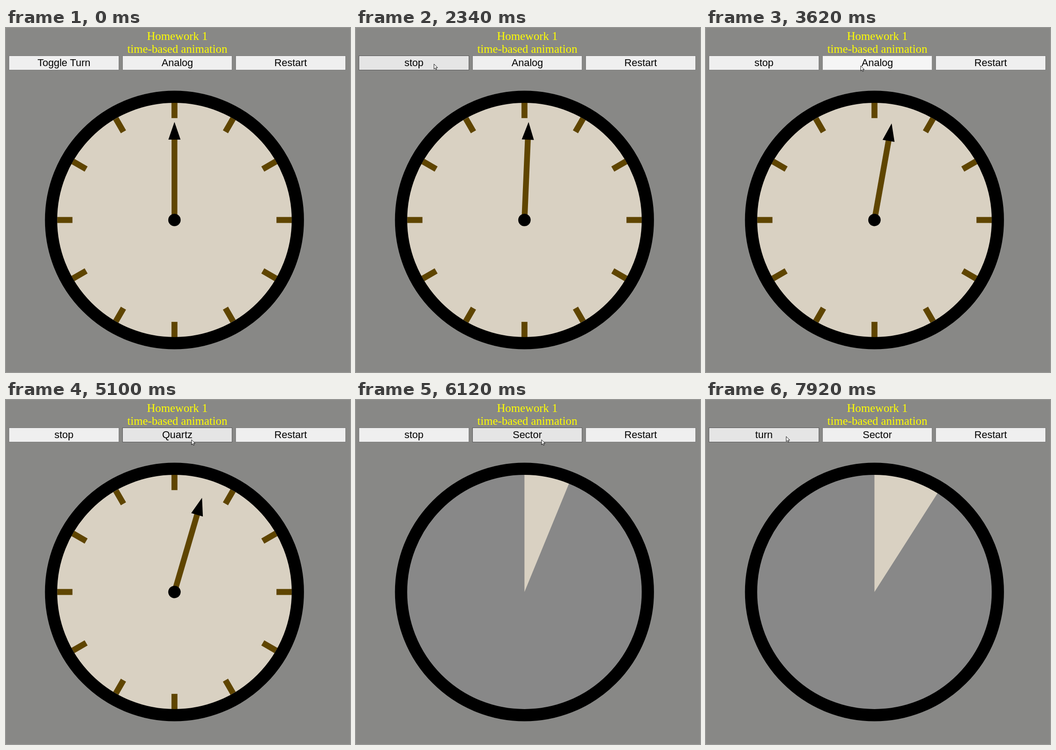
Animation of 748x749 px, one loop 8000 ms. Source, as an HTML page:

```html
<!DOCTYPE html>
<html lang="en">
<head>
<meta charset="utf-8">
<title>time-based animation</title>
<style>
  html, body { margin: 0; width: 100%; height: 100%; overflow: hidden; background: #888886; }
  svg { display: block; width: 748px; height: 749px; }
  .title { font: 25.2px "Liberation Serif", "Times New Roman", serif; fill: #ff0; }
  .label { font: 22px "Liberation Sans", Arial, sans-serif; fill: #000; }
  text { text-anchor: middle; }
  .btn { fill: #efefef; stroke: #7a7a7a; }
  .btn.hover { fill: #e5e5e5; stroke: #555; }
  .btn.active { fill: #f5f5f5; stroke: #8d8d8d; }
</style>
</head>
<body>
<svg viewBox="0 0 748 749">
  <text class="title" x="372.5" y="26">Homework 1</text>
  <text class="title" x="372.5" y="54">time-based animation</text>
  <g id="buttons"></g>
  <g transform="translate(366.3 418)">
    <circle id="face" r="257"/>
    <path id="sector" fill="#d9d1c2"/>
    <g id="ticks" fill="#5f4500"></g>
    <circle r="268.3" fill="none" stroke="#000" stroke-width="26.6"/>
    <g id="hand">
      <rect x="-6.3" y="-176" width="12.6" height="176" fill="#5f4500"/>
      <path d="M0-213.5L13.2-175H-13.2Z"/>
      <circle r="13.5"/>
    </g>
  </g>
  <path id="cursor" d="M.4.5V11.4L2.9 9.1 4.5 12.7 6.3 12 4.7 8.4H8.2Z" fill="#fff" stroke="#000" stroke-width=".9"/>
</svg>
<script>
const LOOP = 8000;
const NS = "http://www.w3.org/2000/svg";
const $ = id => document.getElementById(id);

function add(parent, tag, attrs) {
  const el = document.createElementNS(NS, tag);
  for (const k in attrs) el.setAttribute(k, attrs[k]);
  return parent.appendChild(el);
}

const buttons = [[6, 246], [253, 492], [499, 739]].map(([left, right]) => ({
  left, right,
  box: add($("buttons"), "rect", { x: left + .5, y: 60.5, width: right - left - 1, height: 31 }),
  label: add($("buttons"), "text", { class: "label", x: (left + right) / 2, y: 83 })
}));

for (let a = 0; a < 360; a += 30)
  add($("ticks"), "rect", { x: -6.5, y: -255, width: 13, height: 33.2, transform: `rotate(${a})` });

// time, x, y of the pointer tip
const path = [
  [150, 686, 738], [940, 216, 95], [1260, 194, 78], [1460, 194, 78],
  [1610, 169, 78], [2300, 169, 78], [2600, 173, 78], [2980, 173, 78],
  [3460, 336, 82], [4890, 336, 82], [5100, 403, 86], [7280, 403, 86],
  [7650, 174, 79]
];
const presses = [[1870, 1940], [3570, 3660], [6060, 6115], [7810, 7900]];
const labels = [
  [[0, "Toggle Turn"], [1940, "stop"], [7900, "turn"]],
  [[0, "Analog"], [3660, "Quartz"], [6115, "Sector"]],
  [[0, "Restart"]]
];

const latest = (steps, t) => steps.filter(s => s[0] <= t).pop()[1];

function pointer(t) {
  const i = path.findIndex(p => p[0] > t);
  if (i === 0) return null;
  if (i < 0) return path[path.length - 1].slice(1);
  const [t0, x0, y0] = path[i - 1], [t1, x1, y1] = path[i];
  const u = (t - t0) / (t1 - t0);
  const e = i === 1 ? 1 - (1 - u) ** 1.6 : u * u * (3 - 2 * u);
  return [x0 + (x1 - x0) * e, y0 + (y1 - y0) * e];
}

// six degrees per second: sweeping, then ticking, then as a sector
function angle(t) {
  if (t < 3660) return Math.max(0, (t - 1940) * .006);
  if (t < 6115) return 10.3 + (t >= 4680 ? 6 : 0) + (t >= 5660 ? 6 : 0);
  return 22.3 + Math.max(0, Math.min(t, 7855) - 6150) * .006;
}

function draw(t) {
  const tip = pointer(t);
  const pressed = presses.some(([a, b]) => t >= a && t < b);
  buttons.forEach((b, i) => {
    const over = tip && tip[0] >= b.left && tip[0] < b.right && tip[1] >= 60 && tip[1] < 92;
    b.box.setAttribute("class", "btn" + (over ? pressed ? " active" : " hover" : ""));
    b.label.textContent = latest(labels[i], t);
  });

  const pie = t >= 6115, a = angle(t), r = a * Math.PI / 180;
  $("face").setAttribute("fill", pie ? "#888" : "#d9d1c2");
  $("ticks").style.display = $("hand").style.display = pie ? "none" : "";
  $("sector").style.display = pie ? "" : "none";
  $("sector").setAttribute("d", `M0 0V-257A257 257 0 0 1 ${257 * Math.sin(r)} ${-257 * Math.cos(r)}Z`);
  $("hand").setAttribute("transform", `rotate(${a})`);

  $("cursor").style.display = tip ? "" : "none";
  if (tip) $("cursor").setAttribute("transform", `translate(${tip})`);
}

const start = performance.now();
function frame() {
  draw((performance.now() - start) % LOOP);
  requestAnimationFrame(frame);
}
frame();
</script>
</body>
</html>
```
